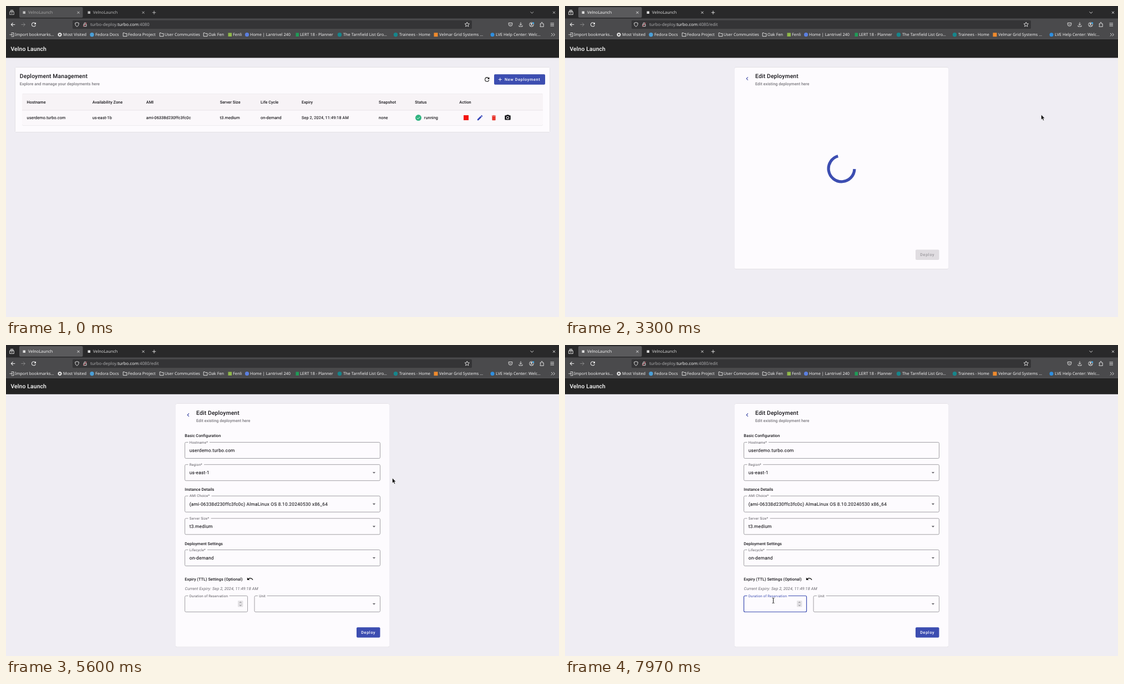
Recreate the animation shown at these times as an HTML page. Size 997 px wide and 561 px high, loop 8 s.

```html
<!DOCTYPE html>
<html lang="en">
<head>
<meta charset="utf-8">
<title>Deployment console</title>
<style>
html,body{margin:0;width:100%;height:100%;overflow:hidden;background:#efedf3}
svg{display:block;width:997px;height:561px}
text{white-space:pre;text-rendering:geometricPrecision}
.ui{font:7.33px "Noto Sans","Open Sans",sans-serif;fill:#f0f0f0}
.url{font-size:7.75px;fill:#a9a9ab}
.pg{font-family:Roboto,sans-serif;fill:#18171b}
.h{font-size:10.38px;font-weight:500;letter-spacing:.0125em}
.sub{font-size:7.27px;font-weight:500;letter-spacing:.0071em}
.cell{font-size:7.27px;letter-spacing:.0179em;stroke:#18171b;stroke-width:.12}
.btn{font-size:7.27px;font-weight:500;letter-spacing:.0893em}
.val{font-size:8.31px;letter-spacing:.03125em;stroke:#18171b;stroke-width:.1}
.lab{font-size:6.23px;letter-spacing:.03125em;fill:#5a585e}
.ln{fill:none;stroke:#ececec;stroke-width:.9}
.card{filter:drop-shadow(0 .5px .4px rgba(0,0,0,.2)) drop-shadow(0 .5px .7px rgba(0,0,0,.12))}
</style>
</head>
<body>
<svg id="stage" viewBox="0 0 997 561"></svg>
<script>
const LOOP = 8000, ROUTE = 2880, LOADED = 4170, FOCUS = 6540;
const BLUE = '#3c4db1';

const text = (x, y, s, cls, more = '') => `<text x="${x}" y="${y}" class="${cls}" ${more}>${s}</text>`;
const rect = (x, y, w, h, fill, r = 0, more = '') =>
  `<rect x="${x}" y="${y}" width="${w}" height="${h}" rx="${r}" fill="${fill}" ${more}/>`;
const dot = (x, y, r, fill) => `<circle cx="${x}" cy="${y}" r="${r}" fill="${fill}"/>`;
const line = (d, more = '') => `<path class="ln" d="${d}" ${more}/>`;
// 24-unit icon centred on x, y
const icon = (x, y, d, fill, k = .519) =>
  `<path d="${d}" fill="${fill}" fill-rule="evenodd" transform="translate(${x} ${y}) scale(${k}) translate(-12 -12)"/>`;
const cross = (x, y, r = 2) => line(`M${x - r} ${y - r}l${2 * r} ${2 * r}m0 ${-2 * r}l${-2 * r} ${2 * r}`);

const ICON = {
  reload: 'M17.65 6.35A7.96 7.96 0 0 0 12 4a8 8 0 1 0 7.73 10h-2.08A6 6 0 1 1 12 6c1.66 0 3.14.69 4.22 1.78L13 11h7V4z',
  pencil: 'M3 17.25V21h3.75L17.81 9.94l-3.75-3.75zM20.71 7.04a1 1 0 0 0 0-1.41l-2.34-2.34a1 1 0 0 0-1.41 0l-1.83 1.83 3.75 3.75z',
  bin: 'M6 19c0 1.1.9 2 2 2h8c1.1 0 2-.9 2-2V7H6zM19 4h-3.5l-1-1h-5l-1 1H5v2h14z',
  camera: 'M9 2L7.17 4H4c-1.1 0-2 .9-2 2v12c0 1.1.9 2 2 2h16c1.1 0 2-.9 2-2V6c0-1.1-.9-2-2-2h-3.17L15 2zm3 15a5 5 0 1 1 0-10 5 5 0 0 1 0 10zm0-1.8a3.2 3.2 0 1 0 0-6.4 3.2 3.2 0 0 0 0 6.4z',
  undo: 'M12.5 8c-2.65 0-5.05.99-6.9 2.6L2 7v9h9l-3.62-3.62c1.39-1.16 3.16-1.88 5.12-1.88 3.54 0 6.55 2.31 7.6 5.5l2.37-.78C21.08 11.03 17.15 8 12.5 8z',
  back: 'M15.41 7.41L14 6l-6 6 6 6 1.41-1.41L10.83 12z',
  star: 'M12 2l3 7 7.5.6-5.7 5 1.7 7.4-6.5-4-6.5 4 1.7-7.4L1.5 9.600 9 9z'
};

// tab strip, dimmed as a whole while the window has no focus
const tabs = () =>
  '<rect id="tab" x="24" y="2" width="114.5" height="19" rx="2"/><g id="strip">' +
  line('M7 9.200h7M8 7.500h5M6.700 10.500h7.600v5h-7.600zM8.800 12.800h3.400') +
  rect(30.5, 9.5, 4.5, 4.5, '#dcdcdc') + rect(147.5, 9.5, 4.5, 4.5, '#dcdcdc') +
  text(157, 14.4, 'VelnoLaunch', 'ui', 'style="fill:#d8d8d8"') +
  cross(130.5, 11.8) + cross(247.5, 11.8) + cross(988, 11.8) +
  line('M263.800 11.800h6.400M267 8.600v6.400M945.500 10.500l2.800 2.600 2.800-2.600') + '</g>' +
  text(40, 14.4, 'VelnoLaunch', 'ui', 'id="tabName"');

const navBar = () =>
  line('M16.300 33.500H9.300m3.200-3.200l-3.200 3.200 3.200 3.200', 'style="stroke-width:1.1"') +
  line('M27.300 33.500h7m-3.200-3.200l3.200 3.200-3.200 3.200', 'opacity=".4"') +
  icon(50, 33.4, ICON.reload, '#f0f0f0', .5) +
  rect(120, 25.8, 720, 15.4, '#343436', 2) +
  line('M128 29.700l3.300 1.100c0 3.300-1 5.200-3.300 6.500-2.300-1.300-3.300-3.200-3.300-6.500z') +
  line('M140 33h5v3.700h-5zM141 33v-1.500a1.500 1.500 0 0 1 3 0V33') +
  line('M139.300 37.300l6.400-7.500', 'style="stroke:#e0485a"') +
  '<text x="152" y="36.3" class="ui url">turbo-deploy.<tspan fill="#f5f5f5">turbo.com</tspan>:4080<tspan id="route">/edit</tspan></text>' +
  line(ICON.star, 'style="stroke-width:2.2" transform="translate(826.5 28.3) scale(.4)"') +
  line('M906.200 30.500h6.600v2.500a3.300 3.300 0 0 1-6.600 0zM907.800 32.600l1.700 1.600 1.700-1.600') +
  line('M928 29.500v5m-2.200-2l2.200 2.200 2.200-2.200M925 35v2h6v-2') +
  '<circle class="ln" cx="947.5" cy="33.5" r="3.8"/>' + dot(947.5, 32.3, 1.4, '#f0f0f0') +
  line('M945.300 35.800q2.200-2.200 4.400 0') + dot(950.7, 30.7, 1.5, '#37a9ee') +
  line('M963 32h2v-1.500a1.100 1.100 0 0 1 2.200 0V32h2v5.300h-6.200v-1.800a1 1 0 0 0 0-2z') +
  line('M981.500 31h6.500M981.500 33.500h6.500M981.500 36h6.500');

function bookmarks() {
  const folder = x => line(`M${x - 3.3} 48.500h2.300l1 1.200h3.500v5h-6.800z`);
  const marks = [
    [16, 'Import bookmarks…'], [103, 'Most Visited'], [161, 'Fedora Docs'], [220, 'Fedora Project'],
    [286, 'User Communities'], [365, 'Oak Fen'], [409, 'Fenli'], [440, 'Home | Lantrivel 240'],
    [530, 'LERT 18 - Planner'], [608, 'The Tarnfield List Gro…'], [709, 'Trainees - Home'],
    [781, 'Velmar Grid Systems …'], [883, 'LVE Help Center: Welc…']
  ];
  return line('M9.500 48.500h4.500v6.500H9.500M6.500 51.700h5m-1.700-1.700l1.700 1.700-1.700 1.700') +
    '<circle class="ln" cx="97" cy="51.7" r="2.3" style="stroke-width:1.7"/>' +
    '<circle class="ln" cx="97" cy="51.7" r="3.4" stroke-dasharray="1.33 1.34"/>' +
    dot(155, 51.7, 3.7, '#4a9fd8') + [214.5, 280.5, 359.5].map(folder).join('') +
    rect(400.5, 48.5, 6.5, 6.5, '#8fb84a') + dot(434.5, 51.7, 3.6, '#5b7fe0') +
    rect(522.5, 48.5, 5.5, 6.5, '#1f9d57') + dot(601.5, 51.7, 3.7, '#16868c') +
    dot(702.5, 51.7, 3.7, '#16868c') + rect(771.5, 48.3, 7, 7, '#ef8a2c') + dot(877, 51.7, 3.5, '#2f8fe0') +
    marks.map(([x, s]) => text(x, 54.3, s, 'ui')).join('') +
    line('M983 49l2.700 2.700-2.700 2.700m3.700-5.400l2.700 2.700-2.700 2.700');
}

const browser = () =>
  rect(0, 0, 997, 23, '#29292a') + rect(0, 22.5, 997, 37, '#4a4a4c') + tabs() + navBar() + bookmarks();

function list() {
  const cols = [
    [37.5, 'Hostname', 'userdemo.turbo.com'], [155.7, 'Availability Zone', 'us-east-1b'],
    [252.8, 'AMI', 'ami-06338d230ffc3fc0c'], [385.7, 'Server Size', 't3.medium'],
    [459, 'Life Cycle', 'on-demand'], [533, 'Expiry', 'Sep 2, 2024, 11:49:18 AM'],
    [672, 'Snapshot', 'none'], [737.3, 'Status', ''], [817.3, 'Action', '']
  ];
  return rect(16.5, 110.5, 964, 117, '#fdfbfe', 2, 'class="card"') +
    text(24.8, 130.4, 'Deployment Management', 'pg h') +
    text(24.8, 143.4, 'Explore and manage your deployments here', 'pg sub', 'style="fill:#77757b"') +
    icon(867.3, 132.5, ICON.reload, '#111') +
    rect(880, 123.3, 92, 18.5, BLUE, 2, 'class="card"') +
    line('M887.800 132.500h6M890.800 129.500v6', 'style="stroke:#fff"') +
    text(899, 135.2, 'New Deployment', 'pg btn', 'style="fill:#fff"') +
    rect(29, 158.5, 939, 56.8, '#fbf8fb', 1.5, 'class="card"') +
    rect(29, 158.5, 939, 29.5, '#f7f3f6', 1.5) + rect(29, 187.7, 939, .6, '#d9d6da') +
    cols.map(([x, a, b]) => text(x, 175.7, a, 'pg sub') + text(x, 204.2, b, 'pg cell')).join('') +
    dot(743.5, 201.6, 5.5, '#2fb380') + line('M740.800 201.800l1.900 1.900 3.600-3.800', 'style="stroke:#fff"') +
    text(753.8, 204.2, 'running', 'pg cell') +
    rect(825, 197, 9, 9, '#f4140e') + icon(854.5, 201.6, ICON.pencil, '#3443b8') +
    icon(879.5, 201.6, ICON.bin, '#e8352c') + icon(904.5, 201.4, ICON.camera, '#121216');
}

// shared head of the edit card; dy shifts it once the form is in
const editHead = dy =>
  icon(328.5, 131 + dy, ICON.back, '#2f3a9e') +
  text(343, 130.4 + dy, 'Edit Deployment', 'pg h') +
  text(343, 143.4 + dy, 'Edit existing deployment here', 'pg sub', 'style="fill:#77757b"');

const deploy = (y, bg, fg) =>
  rect(632, y, 42.5, 18.5, bg, 2) + text(640.2, y + 11.9, 'Deploy', 'pg btn', `style="fill:${fg}"`);

const loading = () =>
  rect(306, 110.5, 385, 364, '#fdfbfe', 2, 'class="card"') + editHead(0) + deploy(439.5, '#e0dde1', '#9c9a9e') +
  `<path id="spin" fill="none" stroke="${BLUE}" stroke-width="5.2"/>`;

const H = 29;
// x, y, width, notch end, label, value, kind
const fields = [
  [322.5, 175.5, 352, 367, 'Hostname*', 'userdemo.turbo.com', 'text'],
  [322.5, 215.7, 352, 357, 'Region*', 'us-east-1', 'select'],
  [322.5, 272.3, 352, 370.5, 'AMI Choice*', '(ami-06338d230ffc3fc0c) AlmaLinux OS 8.10.20240530 x86_64', 'select'],
  [322.5, 312.8, 352, 369.5, 'Server Size*', 't3.medium', 'select'],
  [322.5, 369.5, 352, 363, 'Lifecycle*', 'on-demand', 'select'],
  [322.5, 452.5, 113, 402.5, 'Duration of Reservation', '', 'text'],
  [448, 452.5, 226.5, 470.5, 'Unit', '', 'select']
];

function field([x, y, w, notch, label, value, kind], i) {
  const r = 2;
  const d = `M${notch} ${y}H${x + w - r}q2 0 2 2v${H - 4}q0 2-2 2H${x + r}q-2 0-2-2v${4 - H}q0-2 2-2H${x + 6}`;
  return `<path id="box${i}" d="${d}" fill="none"/>` +
    text(x + 8.3, y + 2, label, 'pg lab', `id="lab${i}"`) + text(x + 8.2, y + 17.3, value, 'pg val') +
    (kind === 'select' ? `<path d="M660.9 ${y + 13.5}h5.200l-2.600 2.600z" fill="#5c5a60"/>` : '');
}

const form = () =>
  rect(306, 105.7, 385, 439, '#fdfbfe', 2, 'class="card"') + editHead(-4.8) +
  [[166.2, 'Basic Configuration'], [263.4, 'Instance Details'], [360.6, 'Deployment Settings'], [424.5, 'Expiry (TTL) Settings (Optional)']]
    .map(([y, s]) => text(322.3, y, s, 'pg sub')).join('') +
  icon(440, 422, ICON.undo, '#111') +
  text(322.5, 442.2, 'Current Expiry: Sep 2, 2024, 11:49:18 AM', 'pg cell', 'style="fill:#68666c;stroke:none;font-style:italic"') +
  fields.map(field).join('') +
  rect(418, 461.3, 9.3, 11.2, '#e4e2e5', 1) +
  line('M421.100 465.200l1.600-1.600 1.600 1.600M421.100 468.800l1.600 1.600 1.600-1.600', 'style="stroke:#55535a;stroke-width:.8"') +
  deploy(509.3, BLUE, '#fff');

const pointers = () =>
  '<path id="arrow" d="M0 0v9.200l2.100-1.900 1.500 3.400 1.600-.7-1.500-3.300h2.900z" fill="#0a0a0a" stroke="#fff" stroke-width=".6"/>' +
  '<path id="hand" d="M-.9.500q.9-1 1.800 0v2.900l4 .7q1 .3.900 1.400l-.7 3.900h-5.300l-3.100-3.700q.4-1.400 2.400.1z" fill="#0a0a0a" stroke="#fff" stroke-width=".6"/>' +
  '<path id="beam" d="M-1.900-4.700q1.900 0 1.900 1v7.400q0 1-1.900 1M1.900-4.700q-1.900 0-1.900 1v7.400q0 1 1.900 1" fill="none" stroke="#161616" stroke-width=".9"/>';

document.getElementById('stage').innerHTML =
  rect(0, 0, 997, 561, '#efedf3') + '<rect id="head" y="59.3" width="997" fill="#242424"/>' +
  text(8.5, 0, 'Velno Launch', 'pg h', 'id="brand" style="fill:#fff"') + browser() +
  `<g id="list">${list()}</g><g id="loading">${loading()}</g><g id="form">${form()}</g><g id="mouse">${pointers()}</g>`;

const $ = id => document.getElementById(id);
const set = (id, o) => { for (const k in o) $(id).setAttribute(k, o[k]); };
const show = (id, on) => { $(id).style.display = on ? '' : 'none'; };

const ease = {
  in: u => u * u,
  out: u => u * (2 - u),
  both: u => u * u * (3 - 2 * u)
};

// Bezier (.4, 0, .2, 1) solved by bisection
function standard(x) {
  let a = 0, b = 1, s = .5;
  for (let i = 0; i < 24; i++) {
    s = (a + b) / 2;
    const bx = 1.2 * s * (1 - s) ** 2 + .6 * s * s * (1 - s) + s ** 3;
    if (bx < x) a = s; else b = s;
  }
  return s * s * (3 - 2 * s);
}

function spinnerPath(s) {
  const half = 666.5, n = Math.floor(s / half), e = standard(s / half - n);
  const sweep = 10 + 270 * (n % 2 ? 1 - e : e);
  const mid = -90 + 360 * s / 1568 + 135 * (n + e);
  const at = deg => {
    const a = deg * Math.PI / 180;
    return `${498.5 + 23.4 * Math.cos(a)} ${293.4 + 23.4 * Math.sin(a)}`;
  };
  return `M${at(mid - sweep / 2)}A23.4 23.4 0 ${sweep > 180 ? 1 : 0} 1 ${at(mid + sweep / 2)}`;
}

// start, end, target x, target y, easing
const moves = [
  [1670, 2070, 841.5, 213, 'out'], [2500, 2740, 858.5, 196, 'both'], [4170, 4440, 698, 235, 'both'],
  [4770, 4840, 696.5, 240, 'both'], [5600, 6140, 480.5, 456, 'in'], [6140, 6270, 376, 461, 'out'],
  [6970, 7070, 375.5, 461, 'both']
];

function mouseAt(t) {
  let x = 997, y = 231;
  for (const [a, b, tx, ty, kind] of moves) {
    if (t < a) break;
    const u = ease[kind](Math.min(1, (t - a) / (b - a)));
    x += (tx - x) * u;
    y += (ty - y) * u;
  }
  return [x, y];
}

function draw(t) {
  const edit = t >= ROUTE, ready = t >= LOADED;
  show('list', !edit);
  show('loading', edit && !ready);
  show('form', ready);
  show('route', edit);
  set('tab', { fill: edit ? '#5a5a5c' : '#505052' });
  set('strip', { opacity: edit ? 1 : .8 });
  $('tabName').style.fill = edit ? '#f4f4f4' : '#a2a2a2';
  set('head', { height: ready ? 29.5 : 34.2 });
  set('brand', { y: ready ? 78.4 : 80.6 });
  if (edit && !ready) set('spin', { d: spinnerPath(t - ROUTE) });

  const [mx, my] = mouseAt(t);
  let pointer = !edit && Math.hypot(mx - 854.5, my - 201.6) < 10 ? 'hand' : 'arrow';
  fields.forEach(([x, y, w, , , , kind], i) => {
    const over = ready && mx > x && mx < x + w && my > y && my < y + H;
    const focus = i === 5 && t >= FOCUS;
    if (over) pointer = kind === 'select' ? 'hand' : 'beam';
    set('box' + i, {
      stroke: focus ? BLUE : over ? '#2c2b2f' : '#8b898e',
      'stroke-width': focus ? 1.2 : .8
    });
    $('lab' + i).style.fill = focus ? BLUE : '';
  });
  show('mouse', t >= 1670);
  for (const p of ['arrow', 'hand', 'beam']) show(p, p === pointer);
  set('mouse', { transform: `translate(${mx} ${my})` });
}

function tick() {
  draw(performance.now() % LOOP);
  requestAnimationFrame(tick);
}
tick();
</script>
</body>
</html>
```
